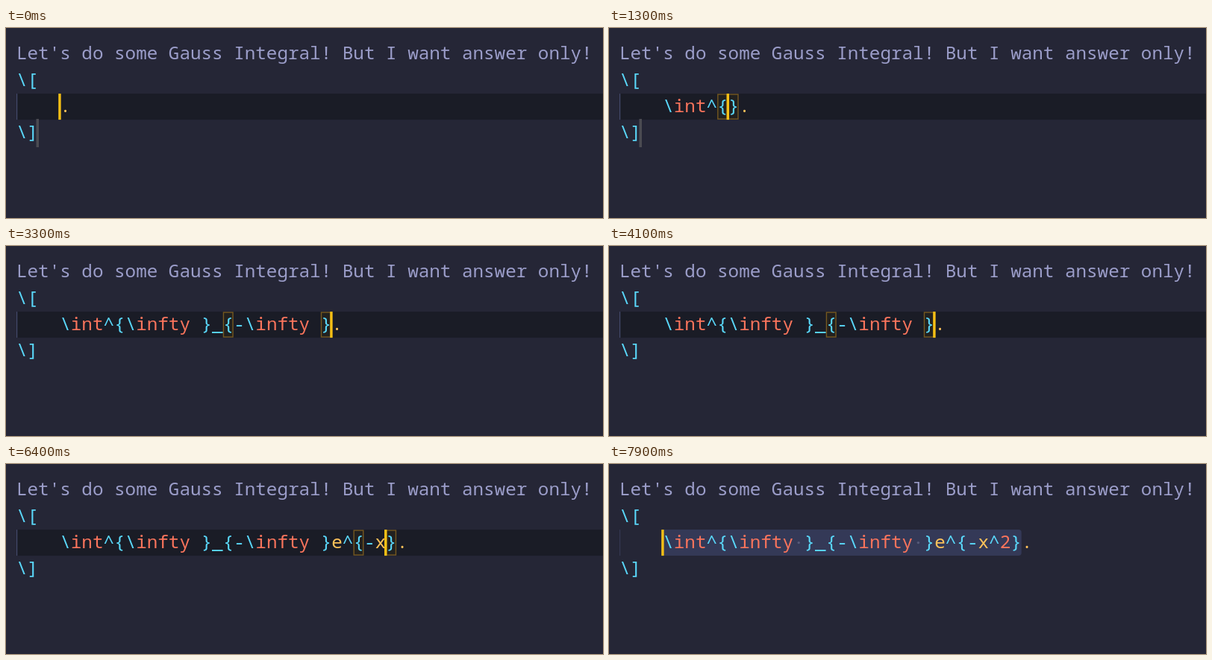
An HTML page for the animation above (8 s loop, 800 px wide and 255 px high).

```html
<!DOCTYPE html>
<html lang="en">
<head>
<meta charset="utf-8">
<title>Typing a formula</title>
<style>
  html, body { margin: 0; width: 100%; height: 100%; overflow: hidden; background: #252636; }
  svg { display: block; }
  text {
    font: 450 24.27px "Noto Sans Mono", "DejaVu Sans Mono", monospace;
    font-variant-ligatures: none;
    white-space: pre;
  }
</style>
</head>
<body>
<svg id="stage" width="800" height="255" viewBox="0 0 800 255"></svg>
<script>
const LOOP = 8000, STEP = 100, BLINK = 500;
const LEFT = 14, CELL = 14.56, ROW = 35.3, TOP = 17.3, INDENT = 4;
const INK = "#9b9dc9", CYAN = "#5ad8fa", CORAL = "#f9745c", AMBER = "#ffc35a",
      TEAL = "#5cc9bf", VIOLET = "#b56bdc", CARET = "#f6c015";

const UPPER = "\\int^{\\infty }";
const BOTH = UPPER + "_{-\\infty }";
const FULL = BOTH + "e^{-x^2}";

// [start ms, formula with | as the caret]
const STEPS = [
  [0, "|"],
  [400, "\\|"],
  [500, "\\i|"],
  [600, "\\in|"],
  [800, "\\int|"],
  [1000, "\\int^|"],
  [1200, "\\int^{|}"],
  [1500, "\\int^{o|}"],
  [1600, "\\int^{oo|}"],
  [1700, "\\int^{\\infty |}"],
  [2000, UPPER + "|"],
  [2300, UPPER + "_|"],
  [2400, UPPER + "_{|}"],
  [2500, UPPER + "_{-|}"],
  [2600, UPPER + "_{-o|}"],
  [2700, UPPER + "_{-oo|}"],
  [2800, UPPER + "_{-\\infty |}"],
  [3100, BOTH + "|"],
  [4900, BOTH + "e|"],
  [5100, BOTH + "e^|"],
  [6000, BOTH + "e^{|}"],
  [6200, BOTH + "e^{-|}"],
  [6400, BOTH + "e^{-x|}"],
  [6600, BOTH + "e^{-x^|}"],
  [6700, BOTH + "e^{-x^2|}"],
  [7000, FULL + "|"],
  [7700, "|" + FULL]
];
const MENU_FROM = 600, MENU_TO = 1000, STOP_GONE = 2000, SELECT_AT = 7700;
const MENUS = {
  "\\in": ["\\in", "\\include", "\\includegraphics", "\\includegraphics[options]{name}"],
  "\\int": ["\\int", "\\intertext", "\\intertext{text}", "\\intextsep"]
};

const stage = document.getElementById("stage");
const colX = c => LEFT + c * CELL;
const rowY = r => TOP + r * ROW;
const rect = (x, y, w, h, fill, more = "") =>
  `<rect x="${x}" y="${y}" width="${w}" height="${h}" fill="${fill}" ${more}/>`;
const text = (x, y, body, fill) => `<text x="${x}" y="${y}" fill="${fill}">${body}</text>`;
const line = (row, body, fill) => text(LEFT, rowY(row) + 25, body, fill);
const span = (body, fill, more = "") => `<tspan fill="${fill}" ${more}>${body}</tspan>`;

function colour(src) {
  return src.replace(/\\[a-z]*|[\^_{}-]|\d|[a-z.]/g, m =>
    m[0] === "\\" ? span("\\", CYAN) + span(m.slice(1), CORAL)
    : /\d/.test(m) ? span(m, CORAL)
    : /[a-z.]/.test(m) ? span(m, AMBER)
    : span(m, CYAN));
}

// Brace pair touching the caret, as two indexes
function bracePair(src, caret) {
  const open = [];
  for (let i = 0; i < src.length; i++) {
    if (src[i] === "{") open.push(i);
    if (src[i] === "}") {
      const pair = [open.pop(), i];
      if (pair.some(p => p === caret || p === caret - 1)) return pair;
    }
  }
  return [];
}

function cube(x, y) {
  return `<path transform="translate(${x} ${y})" fill="none" stroke="${VIOLET}" stroke-width="1.8"
    stroke-linejoin="round" d="M0-11 9.5-6V6L0 11-9.5 6V-6ZM-9.5-6 0-1 9.5-6M0-1V11"/>`;
}

function menu(word) {
  const x = 116, y = 124;
  let out = rect(x, y, 690, 140, "#232433") + rect(x, y, 690, 36, "#1a1b26") +
    `<path d="M800 ${y + .5}H${x + .5}V255" fill="none" stroke="#393b49"/>`;
  MENUS[word].forEach((item, i) => {
    const mid = y + 19 + i * ROW;
    out += cube(x + 17.5, mid) + text(155, mid + 7.5,
      span("\\", i ? INK : TEAL) +
      span(word.slice(1), TEAL, 'font-weight="700"') +
      item.slice(word.length), INK);
  });
  return out;
}

function draw(t) {
  const [since, marked] = STEPS.findLast(s => s[0] <= t);
  const caret = marked.indexOf("|");
  const src = marked.replace("|", "");
  const selected = t >= SELECT_AT;
  const y = rowY(2) + .2, h = 35;
  const at = i => colX(INDENT + i);
  const menuOpen = t >= MENU_FROM && t < MENU_TO;
  let out = rect(0, 0, 800, 255, "#252636");

  if (selected) out += rect(at(0) - 2, y, src.length * CELL + 2, h, "#343957", 'rx="4"');
  else out += rect(LEFT, y, 800, h, "#1a1c26");
  out += rect(LEFT, y, 1.2, h, selected ? "#343750" : "#444a6b");
  if (menuOpen) out += rect(at(0) - 1, y, src.length * CELL, h, "#2d2e38");
  for (const i of bracePair(src, caret))
    out += rect(at(i) + .8, y + 1, 12.6, 33, "#22211f", 'stroke="#755820" stroke-width="1.4"');

  out += line(0, "Let's do some Gauss Integral! But I want answer only!", INK) +
    line(1, "\\[", CYAN) + line(3, "\\]", CYAN) +
    line(2, " ".repeat(INDENT) + colour(src + "."), AMBER);

  if (selected)
    for (let i = 0; i < src.length; i++)
      if (src[i] === " ") out += `<circle cx="${at(i + .5)}" cy="${y + 17.5}" r="1.7" fill="#565a79"/>`;
  if (t < STOP_GONE) out += rect(40.5, 122, 3.5, 38, "#4b4b52");
  if ((t - since) % (2 * BLINK) < BLINK) out += rect(at(caret) - 2, y, 3.4, h, CARET);
  if (menuOpen) out += menu(src);
  stage.innerHTML = out;
}

const start = performance.now();
let shown = -1;
function tick() {
  const t = Math.floor((performance.now() - start) % LOOP / STEP) * STEP;
  if (t !== shown) draw(shown = t);
  requestAnimationFrame(tick);
}
tick();
</script>
</body>
</html>
```
